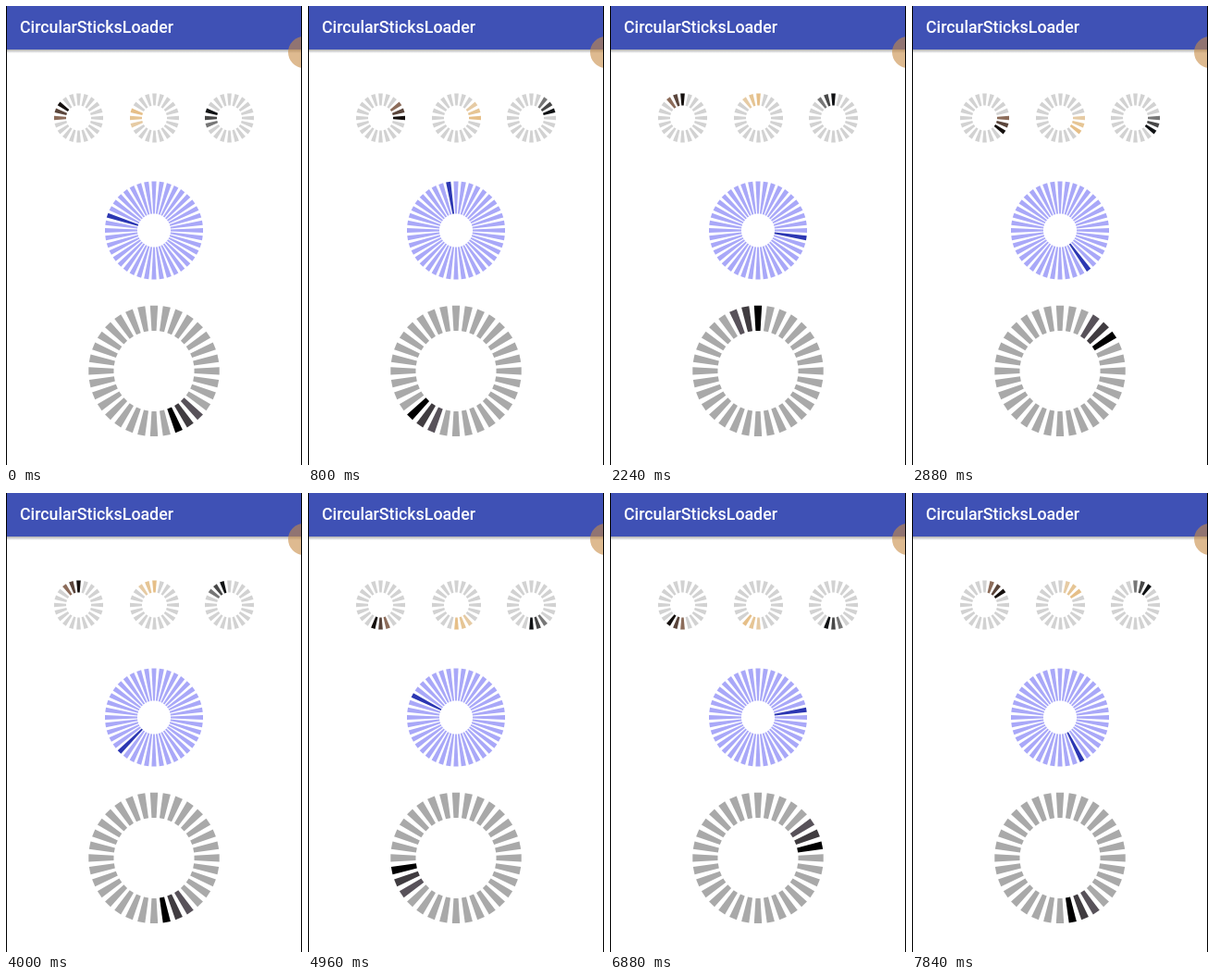
Write an HTML page that moves like this. It is 320 by 496 pixels and loops after 8000 ms.

```html
<!DOCTYPE html>
<html lang="en">
<head>
<meta charset="utf-8">
<title>CircularSticksLoader</title>
<style>
  html, body { margin: 0; width: 100%; height: 100%; overflow: hidden; background: #fff; }
  svg { display: block; width: 320px; height: 496px; }
  text { font: 500 17.78px Roboto, sans-serif; fill: #fff; }
</style>
</head>
<body>
<svg id="stage" viewBox="0 0 320 496">
  <defs>
    <linearGradient id="shadow" x2="0" y2="1">
      <stop offset="0" stop-color="#000" stop-opacity=".32"/>
      <stop offset="1" stop-color="#000" stop-opacity="0"/>
    </linearGradient>
  </defs>
  <rect width="320" height="496" fill="#fff"/>
  <rect y="47" width="320" height="4" fill="url(#shadow)"/>
  <rect width="320" height="47" fill="#3f51b5"/>
  <text x="15" y="29">CircularSticksLoader</text>
  <circle cx="322" cy="50" r="17" fill="#c88c46" fill-opacity=".6"/>
  <g id="rings"></g>
  <path d="M.5 0V496M319.5 0V496" stroke="#000"/>
</svg>
<script>
const LOOP = 8000, STEP = 160;
const keySteps = [0, 10, 18, 25, 31, 38, 49];

// heads: running stick index at each key step; colors: head first, then its trail
const rings = [
  { x: 78.5, y: 121, outer: 26.5, inner: 13.5, count: 20, fill: 0.56, base: '#d2d2d2',
    colors: ['#15100e', '#5a453b', '#8c6c5a'], heads: [17, 33, 47, 60, 71, 83, 103] },
  { x: 160.5, y: 121, outer: 26.5, inner: 13.5, count: 20, fill: 0.56, base: '#d2d2d2',
    colors: ['#e6bf88', '#e6c594', '#e6cba4'], heads: [16, 33, 47, 60, 70, 83, 103] },
  { x: 241.5, y: 121, outer: 26.5, inner: 13.5, count: 20, fill: 0.56, base: '#d2d2d2',
    colors: ['#101214', '#484848', '#777777'], heads: [16, 32, 47, 59, 70, 82, 102] },
  { x: 160, y: 242.5, outer: 53, inner: 18, count: 40, fill: 0.62, base: '#a9a8f8',
    colors: ['#2c37b2'], heads: [32, 45, 56, 65, 73, 83, 97] },
  { x: 160, y: 394.4, outer: 70.7, inner: 43.5, count: 32, fill: 0.6, base: '#a9a9a9',
    colors: ['#000000', '#403c40', '#58525a'], heads: [14, 26, 37, 47, 55, 64, 79] }
];

function buildRing(ring) {
  const half = Math.tan(Math.PI / ring.count * ring.fill);
  const a = ring.outer * half, b = ring.inner * half;
  ring.sticks = Array.from({ length: ring.count }, (_, i) => {
    const stick = document.createElementNS('http://www.w3.org/2000/svg', 'path');
    stick.setAttribute('d', `M${-a} ${-ring.outer}H${a}L${b} ${-ring.inner}H${-b}Z`);
    stick.setAttribute('transform', `translate(${ring.x} ${ring.y}) rotate(${i * 360 / ring.count})`);
    document.getElementById('rings').append(stick);
    return stick;
  });
}

function headAt(heads, step) {
  let k = 0;
  while (k < keySteps.length - 2 && step >= keySteps[k + 1]) k++;
  const part = (step - keySteps[k]) / (keySteps[k + 1] - keySteps[k]);
  return Math.round(heads[k] + (heads[k + 1] - heads[k]) * part);
}

function draw(step) {
  for (const { sticks, count, heads, colors, base } of rings) {
    const head = headAt(heads, step);
    sticks.forEach((stick, i) => {
      const behind = (head - i + count * 9) % count;
      stick.setAttribute('fill', colors[behind] || base);
    });
  }
}

rings.forEach(buildRing);
draw(0);
const start = performance.now();
function tick() {
  const elapsed = Math.max(0, performance.now() - start);
  draw(Math.floor(elapsed % LOOP / STEP));
  requestAnimationFrame(tick);
}
requestAnimationFrame(tick);
</script>
</body>
</html>
```
